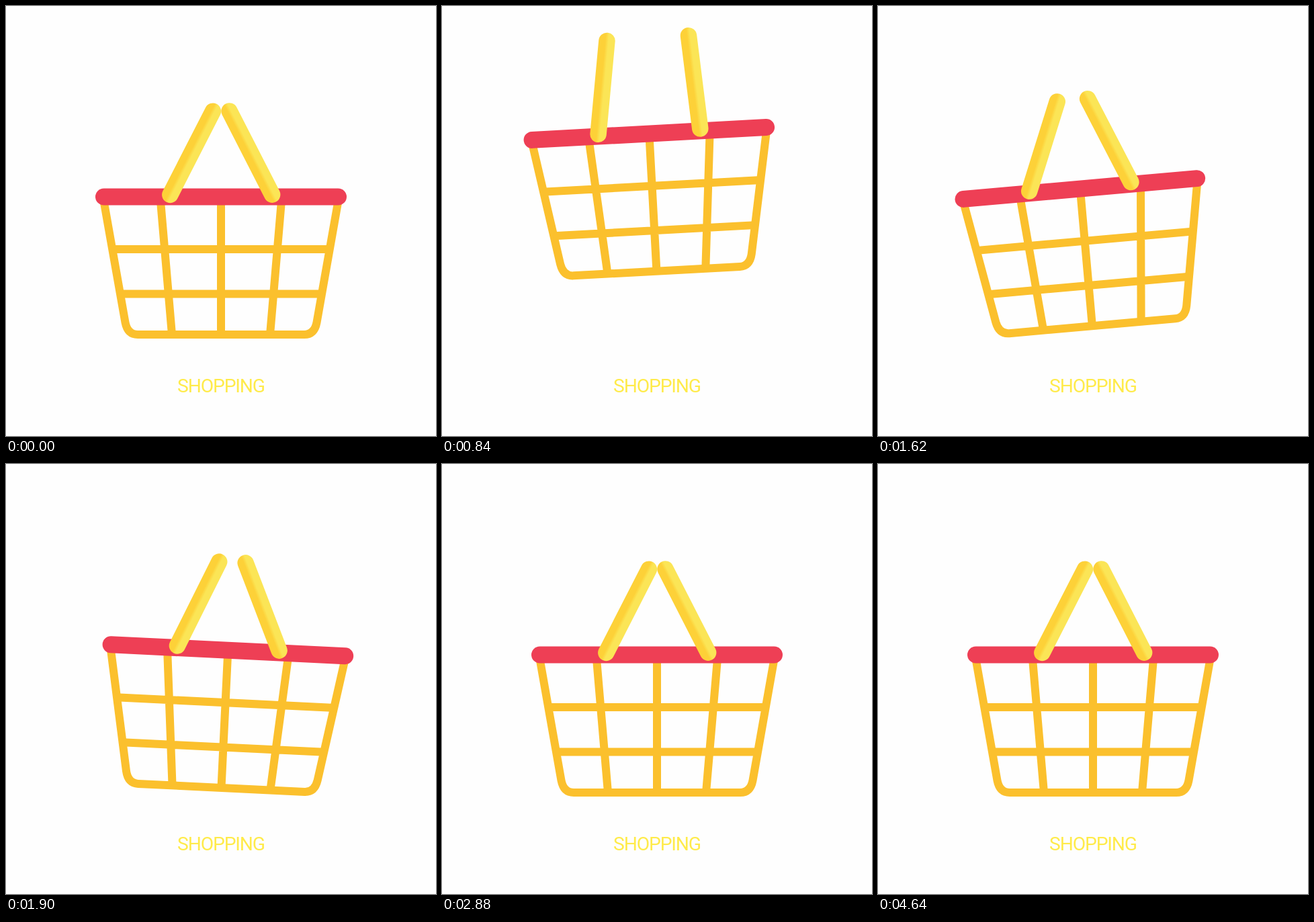
An HTML page for the animation above (4710 ms loop, 640 by 640 pixels).

```html
<!DOCTYPE html>
<html lang="en">
<head>
<meta charset="utf-8">
<title>Shopping</title>
<style>
  html, body { margin: 0; width: 100%; height: 100%; overflow: hidden; background: #fefefe; }
  svg { display: block; width: 100%; height: 100%; }
  #label { font-stretch: 62.5%; letter-spacing: -0.04em; }
</style>
</head>
<body>
<svg viewBox="0 0 640 640">
  <defs>
    <linearGradient id="shade">
      <stop offset="0.4" stop-color="#fdd138"/>
      <stop offset="0.6" stop-color="#fbe556"/>
    </linearGradient>
  </defs>
  <g id="basket">
    <g fill="none" stroke="#fbc02d" stroke-width="12">
      <path d="M145.500 290L177.500 471Q181 489 196 489H444Q459 489 462.500 471L494.500 290"/>
      <path d="M230 290L247 489M320 290V489M410 290L393 489M157 362H483M170 428.500H470"/>
    </g>
    <path d="M145.500 284H494.500" stroke="#ee3f55" stroke-width="25" stroke-linecap="round"/>
    <g fill="url(#shade)">
      <rect id="left" x="-12" y="-152" width="24.500" height="164" rx="12.250"/>
      <rect id="right" x="-12" y="-152" width="24.500" height="164" rx="12.250"/>
    </g>
  </g>
  <text id="label" x="320" fill="#ffeb4a" text-anchor="middle">SHOPPING</text>
</svg>
<script>
const LOOP = 4710, REST = 27.1;
const $ = id => document.getElementById(id);

function smooth(t, from, to) {
  const u = Math.min(1, Math.max(0, (t - from) / (to - from)));
  return u * u * (3 - 2 * u);
}

// Height of the jump, 0 on the ground and 1 at the top.
const lift = t => Math.max(0, 1 - ((t - 766) / 381) ** 2);

function draw(t) {
  const sway = 1 - smooth(t, 1450, 2630);
  const tilt = 5.4 * sway * smooth(t, 250, 500) * Math.sin(Math.PI * (t - 430) / 344);
  const up = lift(t), drift = up * (4 + 1.3 * tilt);
  // The basket rocks on whichever bottom corner it leans over.
  const corner = tilt > 0 ? 465 : 175;
  $("basket").setAttribute("transform",
    `translate(${drift} ${-90 * up}) rotate(${tilt} ${corner} 495)`);

  // The handles fly open in the air, the left one a little later.
  const ajar = 5 * sway * smooth(t, 700, 1000);
  const openL = Math.max(18.7 * lift(t - 80), ajar);
  const openR = Math.max(24 * up, ajar);
  $("left").setAttribute("transform", `translate(244 281) rotate(${REST - openL})`);
  $("right").setAttribute("transform", `translate(396 281) rotate(${openR - REST})`);
}

// Set the label in the narrowest face, at the size that gives its length.
function setLabel() {
  const label = $("label");
  const measure = family => {
    label.style.fontFamily = `"${family}", sans-serif`;
    label.style.fontSize = "100px";
    return label.getComputedTextLength();
  };
  const faces = ["Noto Sans", "Open Sans", "Roboto", "Lato"];
  faces.sort((a, b) => measure(a) - measure(b));
  const size = 100 * 130 / measure(faces[0]);
  label.style.fontSize = size + "px";
  label.setAttribute("y", 564.5 + 0.357 * size);
}

setLabel();
const start = performance.now();
function tick() {
  draw((performance.now() - start) % LOOP);
  requestAnimationFrame(tick);
}
draw(0);
requestAnimationFrame(tick);
</script>
</body>
</html>
```
